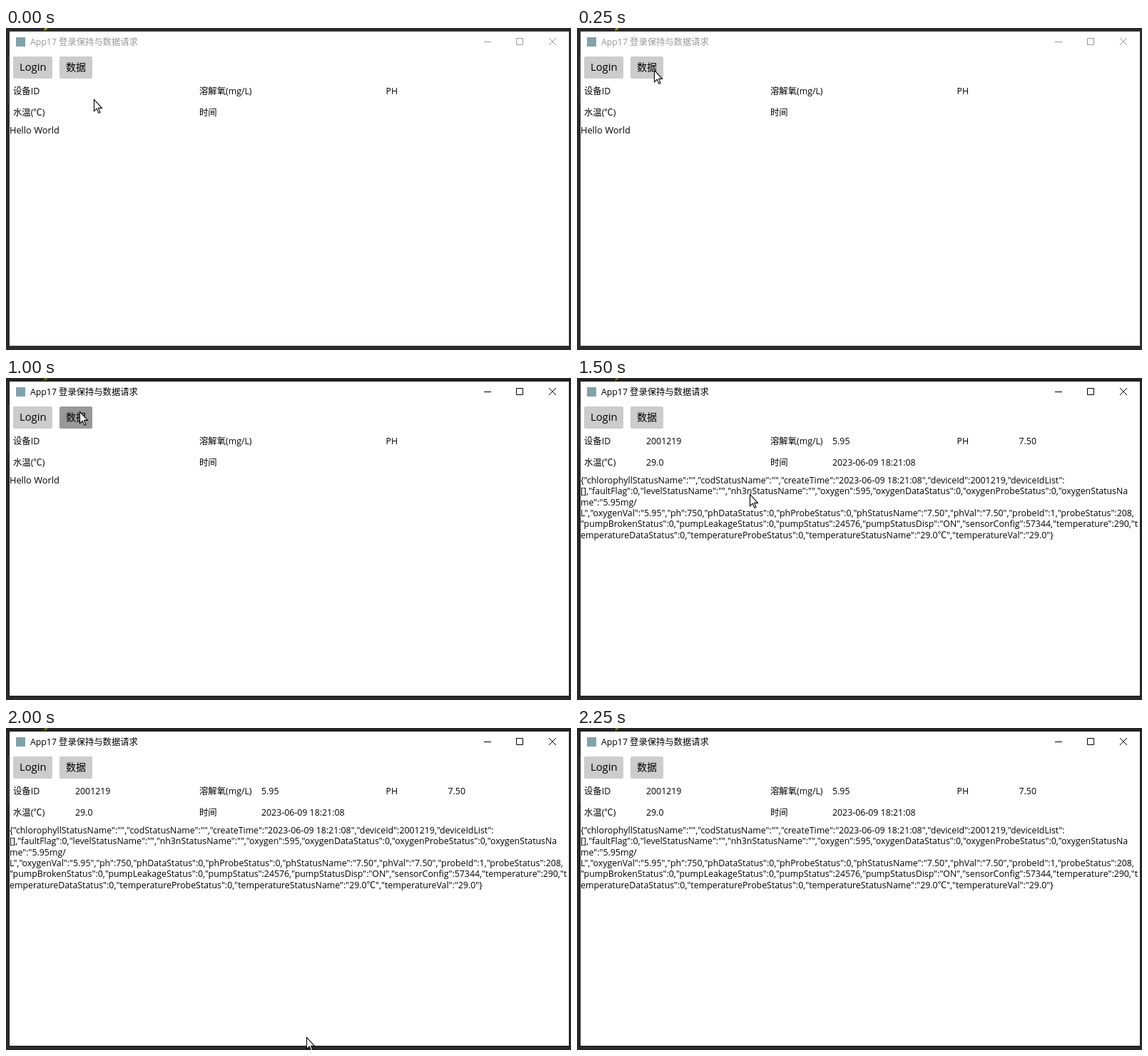
Recreate the animation shown at these times as an HTML page with a canvas. Size 792 by 452 pixels, loop 3000 ms.

```html
<!DOCTYPE html>
<html lang="zh">
<head>
<meta charset="utf-8">
<style>
  html, body { margin: 0; width: 100%; height: 100%; overflow: hidden; background: #2b292b; }
  canvas { display: block; }
</style>
</head>
<body>
<canvas id="stage" width="792" height="452"></canvas>
<script>
const ctx = document.getElementById('stage').getContext('2d');
const FAMILY = '"Open Sans", "Noto Sans CJK SC", "Noto Sans CJK", sans-serif';
const LOOP = 3000;
const ARROW = new Path2D('M.5 .5V16.6L4.2 13.1L6.9 19.4L9 18.5L6.6 12.4H11.5Z');

// Each step holds until the next one; cursor is the arrow's tip.
const steps = [
  { at: 0, cursor: [123, 100], button: '#ccc' },
  { at: 250, cursor: [108, 59], button: '#ccc' },
  { at: 500, cursor: [103, 47], button: '#e5e5e5' },
  { at: 1000, cursor: [103, 47], button: '#999', active: true },
  { at: 1500, cursor: [242, 163], button: '#ccc', active: true, loaded: true },
  { at: 1750, cursor: [396, 364], button: '#ccc', active: true, loaded: true },
  { at: 2000, cursor: [421, 434], button: '#ccc', active: true, loaded: true },
  { at: 2250, cursor: null, button: '#ccc', active: true, loaded: true }
];

const fields = [
  ['设备ID', '2001219', 10, 93],
  ['溶解氧(mg/L)', '5.95', 271, 93],
  ['PH', '7.50', 532.5, 93],
  ['水温(℃)', '29.0', 10, 123],
  ['时间', '2023-06-09 18:21:08', 271, 123]
];

const response = [
  '{"chlorophyllStatusName":"","codStatusName":"","createTime":"2023-06-09 18:21:08","deviceId":2001219,"deviceIdList":',
  '[],"faultFlag":0,"levelStatusName":"","nh3nStatusName":"","oxygen":595,"oxygenDataStatus":0,"oxygenProbeStatus":0,"oxygenStatusNa',
  'me":"5.95mg/',
  'L","oxygenVal":"5.95","ph":750,"phDataStatus":0,"phProbeStatus":0,"phStatusName":"7.50","phVal":"7.50","probeId":1,"probeStatus":208,',
  '"pumpBrokenStatus":0,"pumpLeakageStatus":0,"pumpStatus":24576,"pumpStatusDisp":"ON","sensorConfig":57344,"temperature":290,"t',
  'emperatureDataStatus":0,"temperatureProbeStatus":0,"temperatureStatusName":"29.0℃","temperatureVal":"29.0"}'
];

function rect(x, y, w, h, color) {
  ctx.fillStyle = color;
  ctx.fillRect(x, y, w, h);
}

function text(value, x, y, size = 12.35, color = '#000') {
  ctx.font = `${size}px ${FAMILY}`;
  ctx.fillStyle = color;
  ctx.fillText(value, x, y);
}

function button(label, x, width, size, color) {
  ctx.fillStyle = color;
  ctx.beginPath();
  ctx.roundRect(x, 40, width, 31, 2);
  ctx.fill();
  text(label, x + 9, 60, size);
}

function drawDesktop(active) {
  rect(0, 0, 792, 452, '#2b292b');
  rect(0, 0, 792, 5, active ? '#252325' : '#2b292b');
  rect(3, 38, 1, 68, '#414347');
  rect(54, 0, 4, 2, active ? '#77761c' : '#a09f20');
  rect(53, 2, 3, 2, active ? '#55541f' : '#77761c');
  rect(13, 447, 1, 5, '#3b3b3b');
  rect(4, 4, 786, 443, active ? '#1c1a1c' : '#383638');
  rect(5, 5, 784, 441, '#fff');
}

function drawTitleBar(active) {
  const color = active ? '#000' : '#999';
  rect(14, 13, 13, 13, '#7fa3aa');
  text('App17 登录保持与数据请求', 34, 24, 12.3, color);
  ctx.strokeStyle = color;
  ctx.lineWidth = 1;
  ctx.beginPath();
  ctx.moveTo(670, 19.5);
  ctx.lineTo(680, 19.5);
  ctx.rect(715.5, 14.5, 9, 9);
  ctx.moveTo(761, 14);
  ctx.lineTo(771, 24);
  ctx.moveTo(771, 14);
  ctx.lineTo(761, 24);
  ctx.stroke();
}

function drawCursor([x, y]) {
  ctx.save();
  ctx.translate(x, y);
  ctx.fillStyle = '#fff';
  ctx.strokeStyle = '#000';
  ctx.lineWidth = 1.1;
  ctx.fill(ARROW);
  ctx.stroke(ARROW);
  ctx.restore();
}

function draw(now) {
  const time = now % LOOP;
  const step = steps.findLast(s => s.at <= time);
  drawDesktop(step.active);
  drawTitleBar(step.active);
  button('Login', 10, 55, 14.8, '#ccc');
  button('数据', 75, 46, 14, step.button);
  for (const [label, value, x, y] of fields) {
    text(label, x, y);
    if (step.loaded) text(value, x + 87, y);
  }
  if (step.loaded) response.forEach((line, i) => text(line, 5, Math.round(148 + i * 15.3)));
  else text('Hello World', 5, 148, 12.8);
  if (step.cursor) drawCursor(step.cursor);
}

const start = performance.now();
function tick() {
  draw(performance.now() - start);
  requestAnimationFrame(tick);
}
tick();
</script>
</body>
</html>
```
